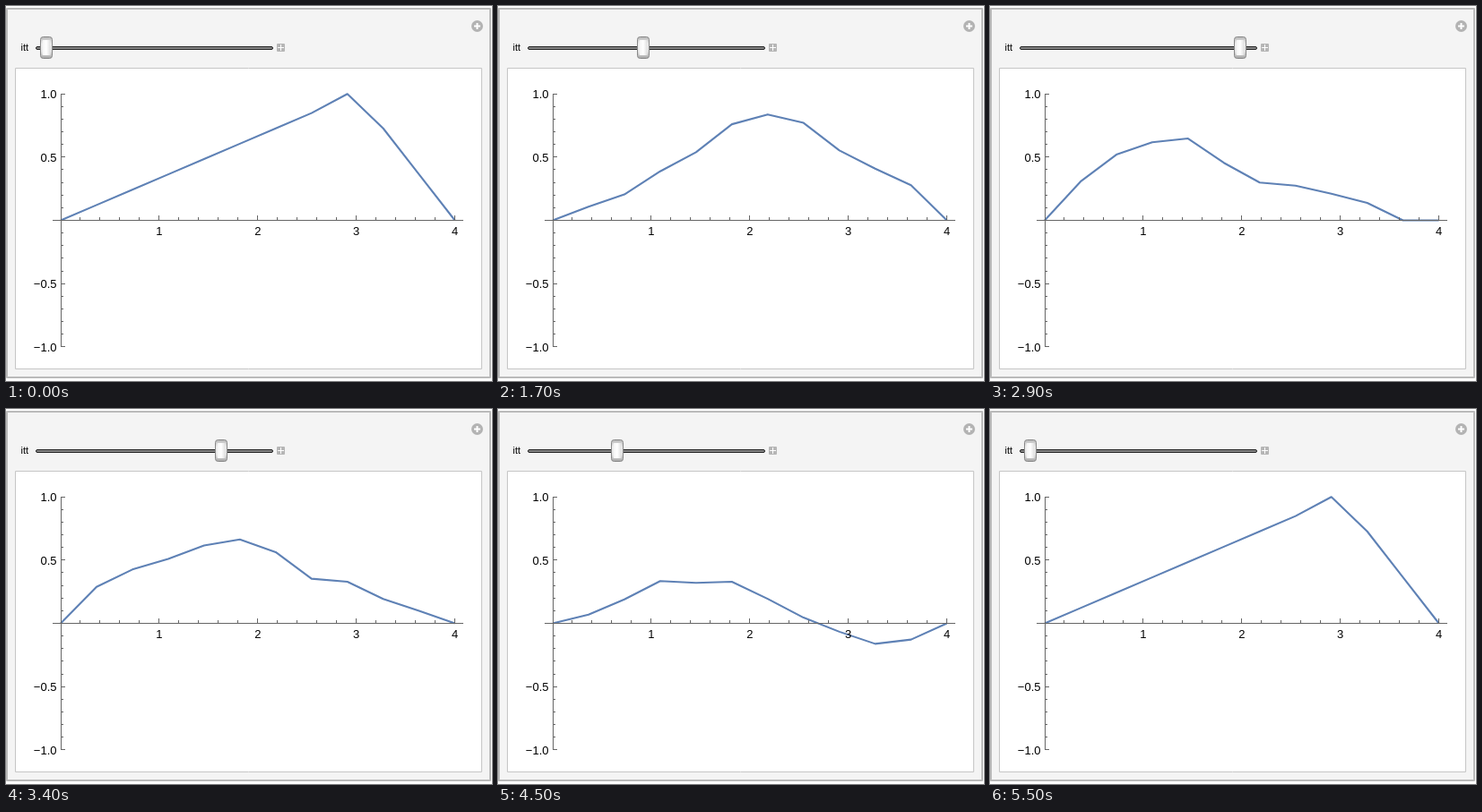
Write an HTML page with a canvas that moves like this. It is 542 by 419 pixels and loops after 6 s.

```html
<!DOCTYPE html>
<html>
<head>
<meta charset="utf-8">
<style>
  html, body { margin: 0; width: 100%; height: 100%; overflow: hidden; background: #fff; }
  canvas { display: block; }
</style>
</head>
<body>
<canvas id="stage" width="542" height="419"></canvas>
<script>
const ctx = document.getElementById('stage').getContext('2d');
const SEGMENTS = 11;
const X0 = 61, Y0 = 239.5, UNIT_X = 109.9, UNIT_Y = 141.3;
const FONT = '"Liberation Sans", Arial, sans-serif';

// Plucked string at rest: rises to node 8, falls to the right end.
const pluck = Array.from({ length: SEGMENTS + 1 }, (_, i) => {
  const x = 4 * i / SEGMENTS;
  return i < 8 ? x / 3 : i === 8 ? 1 : 4 - x;
});

// Sine amplitudes of the modes of the discrete string.
const modes = Array.from({ length: SEGMENTS }, (_, n) =>
  pluck.reduce((sum, u, i) => sum + u * Math.sin(n * i * Math.PI / SEGMENTS), 0) * 2 / SEGMENTS);

function displacement(i, time) {
  return modes.reduce((sum, amp, n) => sum + amp * Math.sin(n * i * Math.PI / SEGMENTS) *
    Math.cos(2 * Math.sin(n * Math.PI / (2 * SEGMENTS)) * time), 0);
}

function box(x, y, w, h, r, fill, stroke) {
  ctx.beginPath();
  ctx.roundRect(x, y, w, h, r);
  ctx.fillStyle = fill;
  ctx.fill();
  if (stroke) {
    ctx.strokeStyle = stroke;
    ctx.lineWidth = 1;
    ctx.stroke();
  }
}

function rect(x, y, w, h, color) {
  ctx.fillStyle = color;
  ctx.fillRect(x, y, w, h);
}

function gradient(x1, y1, x2, y2, ...colors) {
  const g = ctx.createLinearGradient(x1, y1, x2, y2);
  colors.forEach((c, i) => g.addColorStop(i / (colors.length - 1), c));
  return g;
}

function text(str, x, y, size, align) {
  ctx.font = `${size}px ${FONT}`;
  ctx.textAlign = align;
  ctx.fillStyle = '#000';
  ctx.fillText(str, x, y);
}

function drawPanel() {
  rect(0, 0, 542, 419, '#fff');
  box(1, 3, 539, 412, 0, '#f4f4f4');
  ctx.strokeStyle = '#bababa';
  ctx.lineWidth = 2;
  ctx.strokeRect(1, 3, 539, 412);
  box(10.5, 69.5, 520, 336, 0, '#fff', '#c6c6c6');

  box(519, 16, 13, 13, 6.5, '#b3b3b3');
  rect(522, 21.5, 7, 2, '#fff');
  rect(524.5, 19, 2, 7, '#fff');

  box(302, 42, 9, 9, 1, '#b6b6b6');
  rect(303, 46, 7, 1, '#fff');
  rect(306, 43, 1, 7, '#fff');
  text('itt', 16.5, 50, 11, 'left');
}

function drawSlider(center) {
  box(33.5, 45.5, 264, 3, 1.5, '#858585', '#222');
  const x = center - 6.5;
  box(x, 34.5, 13, 24, 3, gradient(0, 34, 0, 59, '#b4b4b4', '#ededed', '#e4e4e4', '#a2a2a2'), '#888');
  box(x + 2, 38, 9, 17, 1, gradient(x, 0, x + 13, 0, '#eee', '#fff', '#d2d2d2'));
}

function drawAxes() {
  const color = '#666';
  rect(52, 239, 458, 1, color);
  rect(61, 98, 1, 283, color);
  for (let i = 0; i <= 20; i++) {
    const h = i % 5 ? 3 : 5;
    rect(Math.floor(X0 + i * UNIT_X / 5), 239 - h, 1, h, color);
  }
  for (let i = -10; i <= 10; i++) {
    rect(62, Math.floor(Y0 - i * UNIT_Y / 10), i % 5 ? 2 : 4, 1, color);
  }
  for (let i = 1; i <= 4; i++) text(i, X0 + i * UNIT_X, 256, 13, 'center');
  for (const v of [1, 0.5, -0.5, -1]) {
    text(v.toFixed(1).replace('-', '\u2212'), 56.5, Math.round(Y0 - v * UNIT_Y) + 5, 13, 'right');
  }
}

function drawString(time) {
  ctx.beginPath();
  pluck.forEach((_, i) =>
    ctx.lineTo(X0 + i * 4 * UNIT_X / SEGMENTS, Y0 - displacement(i, time) * UNIT_Y));
  ctx.strokeStyle = '#5e81b5';
  ctx.lineWidth = 2.1;
  ctx.lineJoin = 'round';
  ctx.stroke();
}

function draw(now) {
  // 25 steps forward and 25 back, resting at both ends.
  const tick = Math.floor(now % 6000 / 100);
  const step = Math.max(0, Math.min(25, tick - 4, 55 - tick));
  const progress = step ? step - 0.913 : 0;
  drawPanel();
  drawSlider(Math.round(44.7 + 9.745 * progress));
  drawString(5.3687 * progress);
  drawAxes();
  requestAnimationFrame(draw);
}
draw(0);
</script>
</body>
</html>
```
